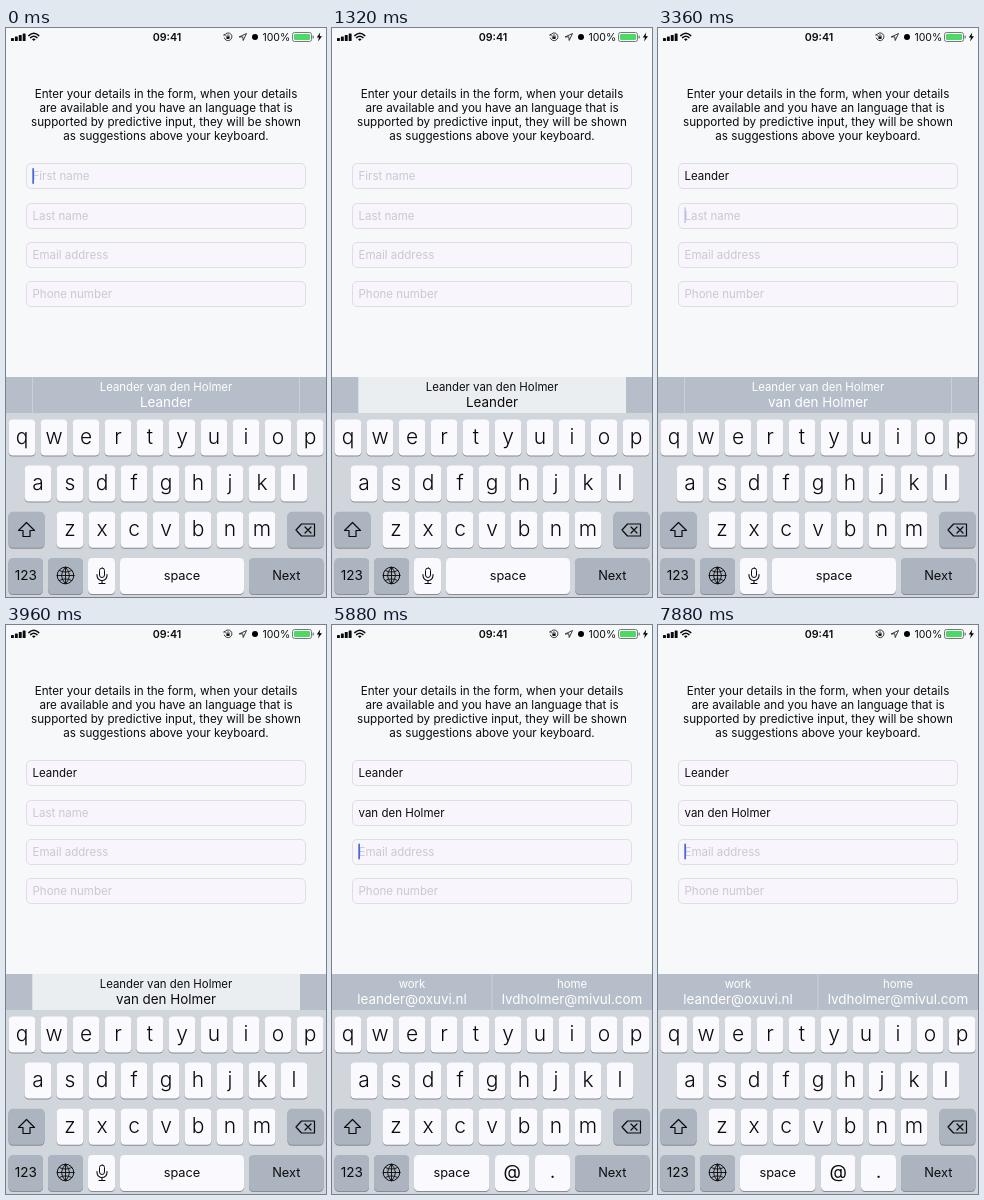
An HTML page that plays this animation: 320x569 px, repeating every 8 s.

```html
<!DOCTYPE html>
<html lang="en">
<head>
<meta charset="utf-8">
<title>Predictive form input</title>
<style>
  html, body { margin: 0; width: 100%; height: 100%; overflow: hidden; background: #f6f8fa; }
  svg { display: block; width: 320px; height: 569px; font-family: Inter, sans-serif; }
  .field { fill: #f8f6fc; stroke: #dedfe2; }
  .line { fill: none; stroke-linejoin: round; stroke-linecap: round; }
</style>
</head>
<body>
<svg id="stage" viewBox="0 0 320 569"></svg>
<script>
const LOOP = 8000;
const FIRST = 'Leander', LAST = 'van den Holmer';
const INK = '#0b0b0d', DIVIDER = '#cbd0d7';
const ROW_GAP = 39.3;
const stage = document.getElementById('stage');

function add(parent, tag, attrs = {}, content = '') {
  const el = document.createElementNS('http://www.w3.org/2000/svg', tag);
  for (const name in attrs) el.setAttribute(name, attrs[name]);
  el.textContent = content;
  return parent.appendChild(el);
}
const group = parent => add(parent, 'g');
const rect = (parent, x, y, width, height, fill, rx = 0) =>
  add(parent, 'rect', { x, y, width, height, fill, rx });
const label = (parent, x, y, size, content, attrs = {}) =>
  add(parent, 'text', { x, y, 'font-size': size, 'text-anchor': 'middle', fill: INK, ...attrs }, content);
const line = (parent, d, width = 1.2, stroke = INK) =>
  add(parent, 'path', { d, class: 'line', 'stroke-width': width, stroke });

function show(el, on) {
  el.setAttribute('visibility', on ? 'visible' : 'hidden');
}

function key(parent, x, y, width, content = '', size = 13, dark = false) {
  rect(parent, x, y + 1, width, 36, '#898c92', 4.2);
  rect(parent, x, y, width, 36, dark ? '#abb4bf' : '#faf9fd', 4.2);
  label(parent, x + width / 2, y + 17.5 + size * 0.33, size, content, { 'font-weight': size > 20 ? 300 : 400 });
}

function drawStatusBar() {
  for (let i = 0; i < 4; i++) rect(stage, 5 + i * 3.9, 10 - i * 1.5, 2.9, 3 + i * 1.5, INK, 0.6);
  line(stage, 'M22.8 7.6Q27.8 3 32.8 7.6M24.6 9.6Q27.8 6.8 31 9.6', 1.5);
  add(stage, 'path', { d: 'M26 11.2Q27.8 9.8 29.6 11.2L27.8 13Z' });
  label(stage, 161, 13, 10.7, '09:41', { 'font-weight': 600 });
  line(stage, 'M218.7 6.7A3.9 3.9 0 1 1 218.3 10M217.6 7L218.8 6.6L219.2 7.8', 0.8);
  rect(stage, 220.4, 8.5, 3.2, 2.4, INK);
  line(stage, 'M221 8.4V7.7A1 1 0 0 1 223 7.7V8.4', 0.6);
  line(stage, 'M233.5 8.8L240.5 5.5L237.2 12.5L236.8 9.2Z', 0.8);
  add(stage, 'circle', { cx: 249, cy: 9, r: 3 });
  label(stage, 270.3, 13, 10.5, '100%');
  rect(stage, 286.5, 4.5, 19, 9, 'none', 2).setAttribute('stroke', '#77797c');
  rect(stage, 288, 6, 16, 6, '#4cd964', 1);
  rect(stage, 306.5, 7.4, 1.3, 3.2, '#77797c', 0.6);
  add(stage, 'path', { d: 'M314.2 4.5L310.8 9.6H313L312 13.5L316 8.2H313.6Z' });
}

function drawField(y, hint, value) {
  add(stage, 'rect', { x: 20.5, y: y + 0.5, width: 279, height: 25, rx: 4.5, class: 'field' });
  const text = (content, fill) =>
    label(stage, 26.5, y + 17, 11.5, content, { 'text-anchor': 'start', fill });
  return { hint: text(hint, '#c9c9cf'), value: text(value, INK) };
}

function drawSuggestion(x, top, bottom, fill = '#fff') {
  const g = group(stage);
  label(g, x, 362.5, 11.4, top, { fill });
  label(g, x, 378.5, 13.4, bottom, { fill });
  return g;
}

function drawKeyboard() {
  rect(stage, 0, 385, 320, 184, '#d1d5dc');
  [[2.5, 'qwertyuiop'], [18.5, 'asdfghjkl'], [50.5, 'zxcvbnm']].forEach(([left, chars], row) =>
    [...chars].forEach((char, i) => key(stage, left + i * 32, 391.5 + row * 46.1, 27, char, 21)));
  key(stage, 2.5, 483.7, 36, '', 13, true);
  key(stage, 281.5, 483.7, 36, '', 13, true);
  line(stage, 'M20.5 494.5L28.5 502.5H24V508.5H17V502.5H12.5Z');
  line(stage, 'M290 502L295.5 496H308.5V508H295.5ZM299 499L305 505M305 499L299 505');
  key(stage, 2.5, 530, 34.5, '123', 13.5, true);
  key(stage, 42, 530, 35, '', 13, true);
  add(stage, 'circle', { cx: 59.5, cy: 547.5, r: 8.3, class: 'line', stroke: INK });
  line(stage, 'M59.5 539.2V555.8M51.2 547.5H67.8M59.5 539.2Q51.5 547.5 59.5 555.8Q67.5 547.5 59.5 539.2' +
    'M53.3 542.5Q59.5 545.8 65.7 542.5M53.3 552.5Q59.5 549.2 65.7 552.5', 0.9);
  key(stage, 243, 530, 74.5, 'Next', 12.8, true);
}

function drawTextKeys() {
  const g = group(stage);
  key(g, 82, 530, 27);
  add(g, 'rect', { x: 93.5, y: 540, width: 5, height: 9.5, rx: 2.5, class: 'line', stroke: INK });
  line(g, 'M91 546.5V547.5A5 5 0 0 0 101 547.5V546.5M96 552.5V555.5M93 555.5H99', 1.1);
  key(g, 114, 530, 124, 'space', 12.8);
  return g;
}

function drawEmailKeys() {
  const g = group(stage);
  key(g, 82, 530, 75.5, 'space', 12.8);
  key(g, 163, 530, 34.5, '@', 18);
  key(g, 203, 530, 35, '.', 18);
  return g;
}

drawStatusBar();
['Enter your details in the form, when your details',
 'are available and you have an language that is',
 'supported by predictive input, they will be shown',
 'as suggestions above your keyboard.']
  .forEach((content, i) => label(stage, 160, 69.5 + i * 14.3, 11.65, content));

const fields = [['First name', FIRST], ['Last name', LAST], ['Email address', ''], ['Phone number', '']]
  .map(([hint, value], i) => drawField(Math.round(135.3 + i * ROW_GAP), hint, value));
const caret = rect(stage, 26.3, 140, 1.7, 16, '#4669e0', 0.8);

rect(stage, 0, 349, 320, 36, '#b6bec9');
const sideDividers = line(stage, 'M26.5 349.5V384.5M293.5 349.5V384.5', 1, DIVIDER);
const midDivider = line(stage, 'M160 349.5V384.5', 1, DIVIDER);
const highlight = rect(stage, 26.5, 349, 267.5, 36, '#ebeef0');
const suggestions = [
  { from: 0, to: 1320, text: FIRST },
  { from: 1320, to: 1400, text: FIRST, pressed: true },
  { from: 1400, to: 1680, text: FIRST },
  { from: 1840, to: 3960, text: LAST },
  { from: 3960, to: 4080, text: LAST, pressed: true },
  { from: 4080, to: 4320, text: LAST }
].map(s => ({ ...s, el: drawSuggestion(160, `${FIRST} ${LAST}`, s.text, s.pressed ? INK : '#fff') }));
const emails = [
  drawSuggestion(80, 'work', 'leander@oxuvi.nl'),
  drawSuggestion(240, 'home', 'lvdholmer@mivul.com')
];

drawKeyboard();
const textKeys = drawTextKeys(), emailKeys = drawEmailKeys();

const fadeOut = (t, start) => 1 - Math.max(0, Math.min(1, (t - start) / 400));

function caretOpacity(t) {
  if (t < 1680) return fadeOut(t, 440);
  if (t < 4320) return fadeOut(t, 3080);
  return t < 7000 ? fadeOut(t, 6040) : 1 - fadeOut(t, 7040);
}

function render(t) {
  const active = t < 1680 ? 0 : t < 4320 ? 1 : 2;
  fields.forEach((field, i) => {
    show(field.hint, i >= active);
    show(field.value, i < active);
  });
  caret.setAttribute('y', 140 + active * ROW_GAP);
  caret.setAttribute('opacity', caretOpacity(t));

  const isOn = s => t >= s.from && t < s.to;
  suggestions.forEach(s => show(s.el, isOn(s)));
  show(highlight, suggestions.some(s => s.pressed && isOn(s)));

  const emailsReady = t >= 4640;
  emails.forEach(el => show(el, emailsReady));
  show(midDivider, emailsReady);
  show(sideDividers, !emailsReady);
  show(textKeys, t < 4440);
  show(emailKeys, t >= 4440);
}

function tick() {
  render(performance.now() % LOOP);
  requestAnimationFrame(tick);
}
tick();
</script>
</body>
</html>
```
